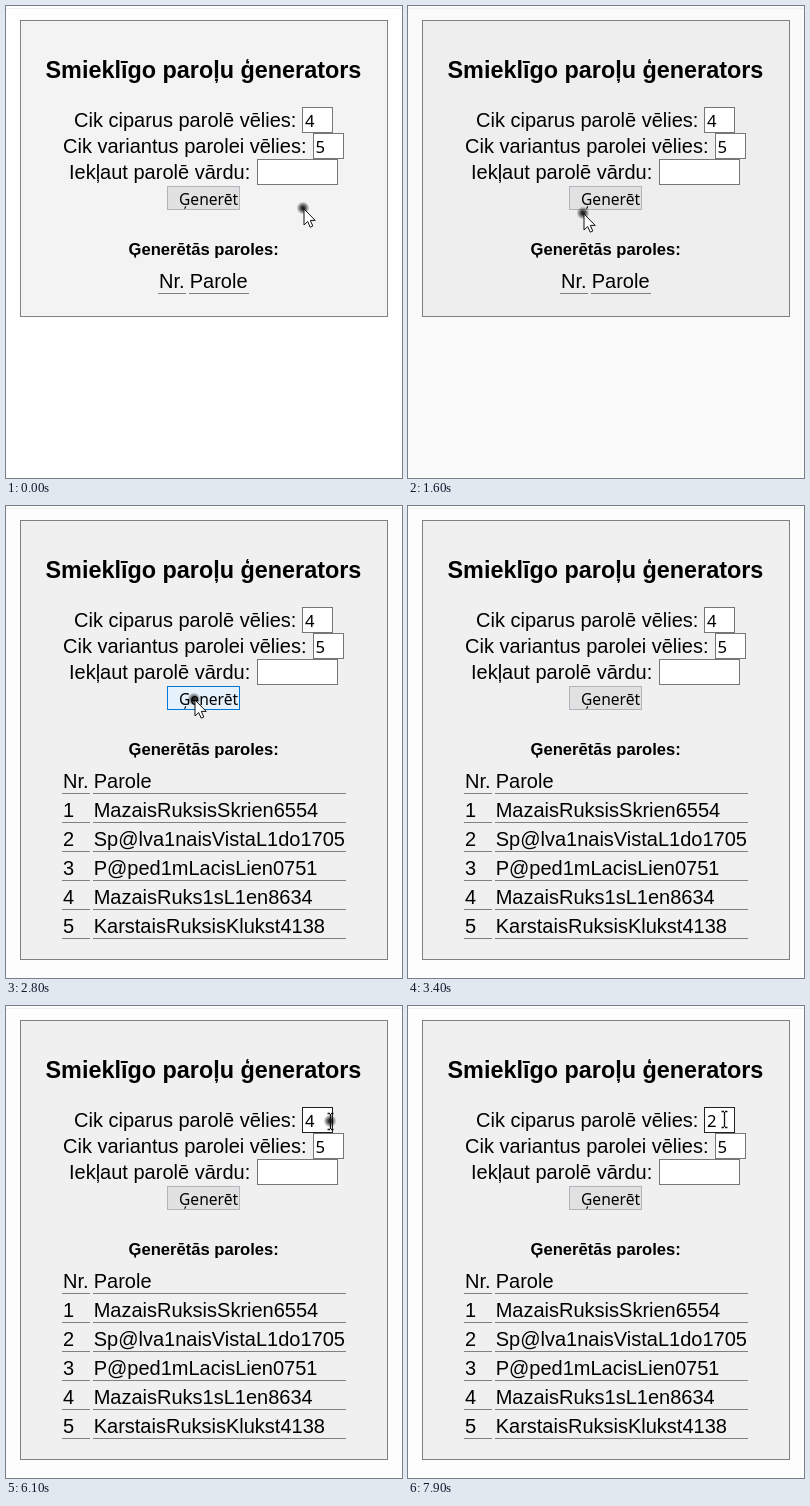
An HTML page for the animation above (8 s loop, 396 px wide and 472 px high).

```html
<!DOCTYPE html>
<html lang="lv">
<head>
<meta charset="utf-8">
<title>Smieklīgo paroļu ģenerators</title>
<style>
  html, body { margin: 0; width: 100%; height: 100%; overflow: hidden; }
  svg { display: block; width: 396px; height: 472px; }
  text { font: 20px "Liberation Sans", sans-serif; fill: #000; white-space: pre; }
  .title { font-size: 23.4px; font-weight: bold; }
  .subtitle { font-size: 16.6px; font-weight: bold; }
  .value { font: 16.7px "Noto Sans", sans-serif; }
  .caption { font: 15.6px "Noto Sans", sans-serif; }
  .field { fill: #fff; stroke: #767676; }
  .rule { stroke: #808080; }
</style>
</head>
<body>
<svg viewBox="0 0 396 472">
  <defs>
    <radialGradient id="glow">
      <stop offset=".2" stop-color="currentColor" stop-opacity=".85"/>
      <stop offset="1" stop-color="currentColor" stop-opacity="0"/>
    </radialGradient>
    <linearGradient id="shell">
      <stop offset="0" stop-color="#eee"/>
      <stop offset=".5" stop-color="#fafafa"/>
      <stop offset="1" stop-color="#b4b4b4"/>
    </linearGradient>
  </defs>
  <rect id="page" width="396" height="472"/>
  <path d="M0 2.5H396" stroke="#f0f0f0"/>
  <rect id="panel" x="14.5" y="14.5" width="367" stroke="#808080"/>

  <text class="title" x="39.5" y="72">Smieklīgo paroļu ģenerators</text>
  <text x="68" y="121">Cik ciparus parolē vēlies:</text>
  <text x="57" y="147">Cik variantus parolei vēlies:</text>
  <text x="63" y="173">Iekļaut parolē vārdu:</text>
  <rect id="digits" class="field" x="296.5" y="101.5" width="30" height="25"/>
  <rect class="field" x="307.5" y="127.5" width="30" height="25"/>
  <rect class="field" x="251.5" y="153.5" width="80" height="25"/>
  <rect id="selection" x="299" y="104" width="10" height="20" fill="#0078d7"/>
  <text id="digitsValue" class="value" x="299" y="121"></text>
  <text class="value" x="309.5" y="147">5</text>
  <rect id="button" x="161.5" y="180.5" width="72" height="23"/>
  <text id="caption" class="caption" x="173" y="199">Ģenerēt</text>
  <text class="subtitle" x="122.5" y="249">Ģenerētās paroles:</text>
  <g id="emptyTable"></g>
  <g id="fullTable"></g>

  <g id="pointer">
    <circle id="halo" r="6.5" fill="url(#glow)"/>
    <path id="arrow" d="M1 1V17L4.7 13.5L7.2 19.2L9.8 18L7.3 12.4H12.2Z" fill="#fff" stroke="#111"/>
    <path id="beam" d="M-2.5 -7.5H0M1 -7.5H3.5M.5 -7V8M-2.5 8.5H0M1 8.5H3.5" fill="none" stroke="#111" stroke-width="1.3"/>
    <g id="mouse" transform="translate(17 18)">
      <rect x=".5" y=".5" width="20" height="31" rx="10" fill="url(#shell)" stroke="#8b8b8b"/>
      <path d="M.5 14V10.500A10 10 0 0 1 10.500 .5V14Z" fill="#8fc5ee" stroke="#5b9bd0"/>
      <path d="M.5 14.500H20.500M10.500 1V14" stroke="#8b8b8b"/>
      <rect x="9" y="5" width="3" height="6" rx="1.500" fill="#777"/>
    </g>
  </g>
</svg>
<script>
const LOOP = 8000, STEP = 100;
const $ = id => document.getElementById(id);
const set = (id, attrs) => {
  for (const name in attrs) $(id).setAttribute(name, attrs[name]);
};
const show = (id, on) => set(id, { visibility: on ? "visible" : "hidden" });
const within = (t, from, to) => t >= from && t < to;

const passwords = ["MazaisRuksisSkrien6554", "Sp@lva1naisVistaL1do1705",
  "P@ped1mLacisLien0751", "MazaisRuks1sL1en8634", "KarstaisRuksisKlukst4138"];

function buildTable(id, left, split, right, rows) {
  $(id).innerHTML = [["Nr.", "Parole"], ...rows].map(([number, word], i) => {
    const y = 282 + 29 * i;
    return `<text x="${left + 1}" y="${y}">${number}</text>
      <text x="${split + 0.7}" y="${y}">${word}</text>
      <path class="rule" d="M${left} ${y + 5.5}H${split - 3}M${split} ${y + 5.5}H${right}"/>`;
  }).join("");
}
buildTable("emptyTable", 152, 183, 243, []);
buildTable("fullTable", 56, 87, 340, passwords.map((word, i) => [i + 1, word]));

// Pointer stops: time, x, y
const path = [
  [0, 297, 202], [1000, 297, 202], [1500, 178, 209], [1600, 175, 207],
  [1900, 188, 193], [3000, 188, 193], [3400, 372, 430], [5800, 372, 430],
  [5900, 364, 374], [6100, 324, 115], [6300, 317, 113], [6400, 317, 113],
  [6500, 310, 117], [7000, 297, 119], [7500, 297, 119], [7700, 316, 113],
  [LOOP, 316, 113]
];
function pointerAt(t) {
  const i = path.findIndex(stop => stop[0] > t);
  const [t0, x0, y0] = path[i - 1], [t1, x1, y1] = path[i];
  const k = (t - t0) / (t1 - t0);
  return [x0 + (x1 - x0) * k, y0 + (y1 - y0) * k];
}

function render(t) {
  const done = t >= 2600;
  const fade = Math.min(1, Math.max(0, (t - 300) / 500));
  const gray = v => `rgb(${v},${v},${v})`;
  set("page", { fill: gray(done ? 253 : 254 - 4 * fade) });
  set("panel", { fill: gray(done ? 240 : 243 - 5 * fade), height: done ? 439 : 296 });
  show("emptyTable", !done);
  show("fullTable", done);

  const pressed = within(t, 2200, 2700), hover = within(t, 1700, 3200);
  set("button", {
    fill: pressed ? "#cce4f7" : hover ? "#e5f1fb" : "#e1e1e1",
    stroke: hover ? "#0078d7" : "#b3b3bb"
  });
  set("caption", { x: pressed ? 174 : 173, y: pressed ? 200 : 199 });

  const dragging = within(t, 6500, 7100), selected = within(t, 6800, 7400);
  set("digits", { style: t >= 6000 ? "stroke:#222" : "" });
  show("selection", selected);
  set("digitsValue", { style: selected ? "fill:#fff" : "" });
  $("digitsValue").textContent = t < 7400 ? 4 : 2;

  const [x, y] = pointerAt(t);
  const visible = t < 3400 || t >= 5900, text = t >= 6100;
  set("pointer", { transform: `translate(${x} ${y})` });
  show("halo", visible && t < 7400);
  set("halo", { color: within(t, 2200, 3000) || dragging ? "#d2551e" : "#d99a2b" });
  show("arrow", visible && !text);
  show("beam", text && !within(t, 7400, 7600));
  show("mouse", pressed || dragging);
}

function frame() {
  render(Math.floor(performance.now() % LOOP / STEP) * STEP);
  requestAnimationFrame(frame);
}
frame();
</script>
</body>
</html>
```
